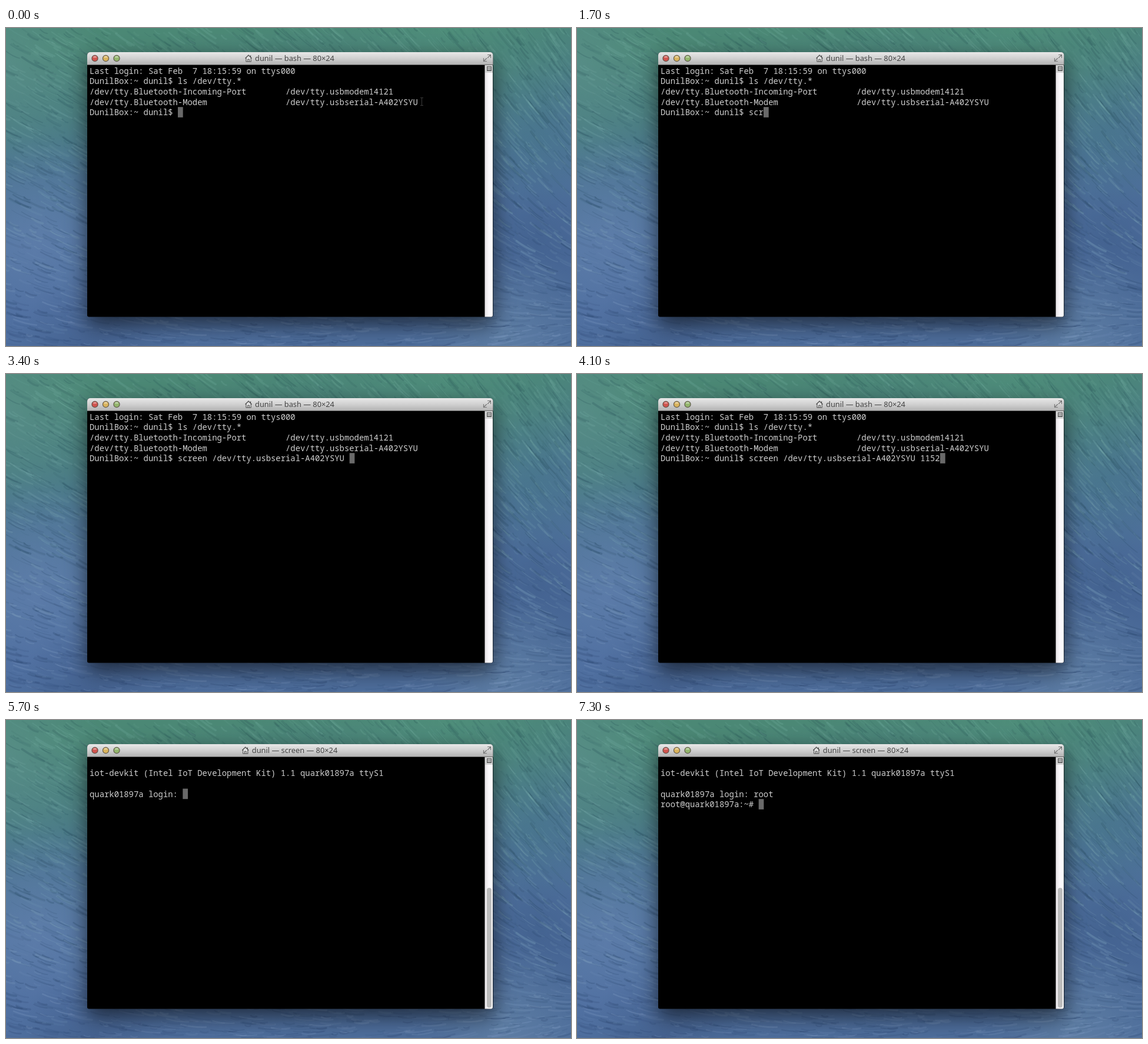
An HTML page with a canvas for the animation above (7400 ms loop, 960 by 540 pixels).

```html
<!DOCTYPE html>
<html lang="en">
<head>
<meta charset="utf-8">
<title>Terminal serial session</title>
<style>
  html, body { margin: 0; width: 100%; height: 100%; overflow: hidden; background: #4a7090; }
  canvas { display: block; }
</style>
</head>
<body>
<canvas id="stage" width="960" height="540"></canvas>
<script>
const W = 960, H = 540, LOOP = 7400, STEP = 100;
const LEFT = 142, TOP = 63.8, CELL = 25 / 3, ROW = 17.6;
const MONO = '300 13.89px "Noto Sans Mono", monospace';
const TITLE = '12.8px "Noto Sans", sans-serif';
const KEYS = '35px Lato, sans-serif';
const PORT = '/dev/tty.usbserial-A402YSYU';
const PROMPT = 'DunilBox:~ dunil$ ';
const HISTORY = [
  'Last login: Sat Feb  7 18:15:59 on ttys000',
  PROMPT + 'ls /dev/tty.*',
  '/dev/tty.Bluetooth-Incoming-Port'.padEnd(40) + '/dev/tty.usbmodem14121',
  '/dev/tty.Bluetooth-Modem'.padEnd(40) + PORT
];
const BANNER = ['', 'iot-devkit (Intel IoT Development Kit) 1.1 quark01897a ttyS1', ''];

const ctx = document.getElementById('stage').getContext('2d');
const clamp = v => Math.max(0, Math.min(1, v));
const ramp = (t, from, to) => clamp((t - from) / (to - from));
const mix = (a, b, k) => a + (b - a) * k;
const typed = (text, t, start, pace) =>
  text.slice(0, t < start ? 0 : Math.floor((t - start) / pace) + 1);

function seeded(seed) {
  return () => (seed = (seed * 16807) % 2147483647) / 2147483647;
}

function layer(paint) {
  const canvas = document.createElement('canvas');
  canvas.width = W;
  canvas.height = H;
  paint(canvas.getContext('2d'));
  return canvas;
}

function gradient(c, x0, y0, x1, y1, colors) {
  const g = c.createLinearGradient(x0, y0, x1, y1);
  colors.forEach((color, i) => g.addColorStop(i / (colors.length - 1), color));
  return g;
}

function glow(c, x, y, radius, rgb, alpha) {
  const g = c.createRadialGradient(x, y, 0, x, y, radius);
  g.addColorStop(0, `rgba(${rgb},${alpha})`);
  g.addColorStop(1, `rgba(${rgb},0)`);
  c.fillStyle = g;
  c.fillRect(0, 0, W, H);
}

// Soft water: tonal gradients with faint streaks along the swell.
function paintWater(c) {
  c.fillStyle = gradient(c, 420, 0, 480, H,
    ['#4b8875', '#4a7f80', '#4d7594', '#5376a2', '#4f6fa0', '#4d6d9b']);
  c.fillRect(0, 0, W, H);
  glow(c, 0, 60, 170, '98,146,150', 0.5);
  glow(c, 50, 350, 170, '102,130,176', 0.5);
  glow(c, 900, 360, 190, '60,90,134', 0.6);
  glow(c, 760, 10, 230, '82,152,122', 0.45);
  glow(c, 900, 190, 120, '66,118,130', 0.4);
  glow(c, 850, 520, 150, '104,136,170', 0.6);
  glow(c, 150, 545, 130, '56,82,126', 0.45);
  const random = seeded(77);
  c.lineCap = 'round';
  for (let i = 0; i < 3600; i++) {
    const x = random() * W, y = random() * H, u = x / W, v = y / H;
    const angle = mix(0.48 + 0.45 * u, 0.2 - 0.5 * u, v ** 3);
    const length = 4 + 18 * random();
    const dx = Math.cos(angle) * length, dy = Math.sin(angle) * length;
    const light = `${mix(120, 140, v)},${mix(180, 165, v)},${mix(165, 205, v)}`;
    const dark = `36,${mix(78, 60, v)},${mix(82, 104, v)}`;
    c.strokeStyle = `rgba(${random() < 0.5 ? light : dark},${0.06 + 0.18 * random()})`;
    c.lineWidth = 0.8 + 3 * random();
    c.beginPath();
    c.moveTo(x - dx, y - dy);
    c.quadraticCurveTo(x, y + 3, x + dx, y + dy);
    c.stroke();
  }
}

function paintWindow(c) {
  c.save();
  c.shadowColor = 'rgba(0,0,0,.62)';
  c.shadowBlur = 36;
  c.shadowOffsetY = 13;
  c.fillStyle = '#000';
  c.beginPath();
  c.roundRect(138, 41, 689.5, 449.5, [5, 5, 3, 3]);
  c.fill();
  c.restore();

  c.fillStyle = gradient(c, 0, 41, 0, 63, ['#e8e8e8', '#cfcfcf', '#b0b0b0']);
  c.beginPath();
  c.roundRect(138, 41, 689.5, 21.5, [5, 5, 0, 0]);
  c.fill();
  c.fillStyle = '#666';
  c.fillRect(138, 62, 689.5, 1);

  ['#d0544e', '#d9b35c', '#93b56c'].forEach((color, i) => {
    const x = 151 + i * 18.5;
    c.fillStyle = color;
    c.strokeStyle = 'rgba(70,60,50,.75)';
    c.lineWidth = 1.2;
    c.beginPath();
    c.arc(x, 51.5, 5.1, 0, 7);
    c.fill();
    c.stroke();
    c.fillStyle = 'rgba(255,255,255,.4)';
    c.beginPath();
    c.ellipse(x, 49, 3, 1.6, 0, 0, 7);
    c.fill();
  });

  c.strokeStyle = '#777';
  c.lineWidth = 1.2;
  c.stroke(new Path2D('M818.5 45.5H823.5V50.5M823.5 45.5L818.5 50.5M811.5 51.5V56.5H816.5M811.5 56.5L816.5 51.5'));

  c.fillStyle = gradient(c, 813, 0, 828, 0, ['#e6e3e6', '#fbf8fb', '#fff']);
  c.beginPath();
  c.roundRect(813.5, 63, 13.5, 427.5, [0, 0, 3, 0]);
  c.fill();
  c.fillStyle = '#d5d5d5';
  c.fillRect(814, 63, 13, 13);
  c.strokeStyle = '#555';
  c.lineWidth = 1;
  c.strokeRect(817.5, 65.5, 7, 7);
  c.fillStyle = '#777';
  [67, 69, 71].forEach(y => c.fillRect(818, y, 6, 1));
}

function drawTitle(program) {
  const title = `dunil — ${program} — 80×24`;
  ctx.font = TITLE;
  const x = 490.5 - ctx.measureText(title).width / 2;
  ctx.fillStyle = '#444';
  ctx.fillText(title, x, 56.2);
  ctx.save();
  ctx.translate(x - 11, 45.5);
  ctx.fillStyle = '#f4f4f4';
  ctx.strokeStyle = '#444';
  ctx.lineWidth = 1.1;
  const house = new Path2D('M-5.5 6L0 .5L5.5 6M-4 5V11.5H4V5M-1.3 11.5V7.5H1.3V11.5M3.5 3.5V1');
  ctx.fillRect(-4, 5, 8, 6.5);
  ctx.stroke(house);
  ctx.restore();
}

function drawText(lines) {
  const last = lines.length - 1;
  ctx.fillStyle = '#696969';
  ctx.fillRect(LEFT + lines[last].length * CELL, TOP + last * ROW, 8.7, ROW);
  ctx.font = MONO;
  ctx.fillStyle = '#cecece';
  lines.forEach((line, i) => ctx.fillText(line, LEFT, TOP + 13.9 + i * ROW));
}

function drawSelection(t) {
  const mouse = mix(706, 484, ramp(t, 100, 600));
  const first = Math.floor((mouse - 146) / CELL);
  ctx.fillStyle = '#5a5a5a';
  ctx.fillRect(LEFT + first * CELL, TOP + 3 * ROW, (67 - first) * CELL, ROW);
  ctx.strokeStyle = '#3a3a3a';
  ctx.lineWidth = 1;
  ctx.stroke(new Path2D(`M${mouse - 2} 118.5h5M${mouse + .5} 118.5v13M${mouse - 2} 131.5h5`));
}

function drawKeys(label, width, opacity) {
  if (opacity <= 0) return;
  ctx.globalAlpha = opacity;
  ctx.fillStyle = '#b0b0b0';
  ctx.beginPath();
  ctx.roundRect(408, 236.5, width, 67, 9);
  ctx.fill();
  ctx.font = KEYS;
  ctx.fillStyle = '#000';
  ctx.fillText(label, 420.5, 282.5);
  ctx.globalAlpha = 1;
}

function shellLines(t) {
  const command = typed('screen ', t, 1500, 100)
    + (t >= 2900 ? PORT + ' ' : '')
    + typed('115200 -L', t, 3600, 160);
  return [...HISTORY, PROMPT + command];
}

function deviceLines(t) {
  if (t < 5600) return [''];
  const lines = [...BANNER, 'quark01897a login: ' + typed('root', t, 6200, 150)];
  if (t >= 6900) lines.push('root@quark01897a:~# ');
  return lines;
}

const backdrop = layer(c => {
  paintWater(c);
  paintWindow(c);
});

function draw(t) {
  const connected = t >= 5400;
  ctx.drawImage(backdrop, 0, 0);
  drawTitle(connected ? 'screen' : 'bash');
  if (t < 1500) drawSelection(t);
  drawText(connected ? deviceLines(t) : shellLines(t));
  if (connected) {
    ctx.fillStyle = '#bcbcbc';
    ctx.beginPath();
    ctx.roundRect(817, 285, 8, 203.5, 4);
    ctx.fill();
  }
  drawKeys('Cmd+C', 144, ramp(t, 570, 900) - ramp(t, 1200, 1500));
  drawKeys('Cmd+P', 136, ramp(t, 2270, 2680) - ramp(t, 3100, 3400));
}

function tick() {
  draw(Math.floor((performance.now() % LOOP) / STEP) * STEP);
  requestAnimationFrame(tick);
}
tick();
</script>
</body>
</html>
```
